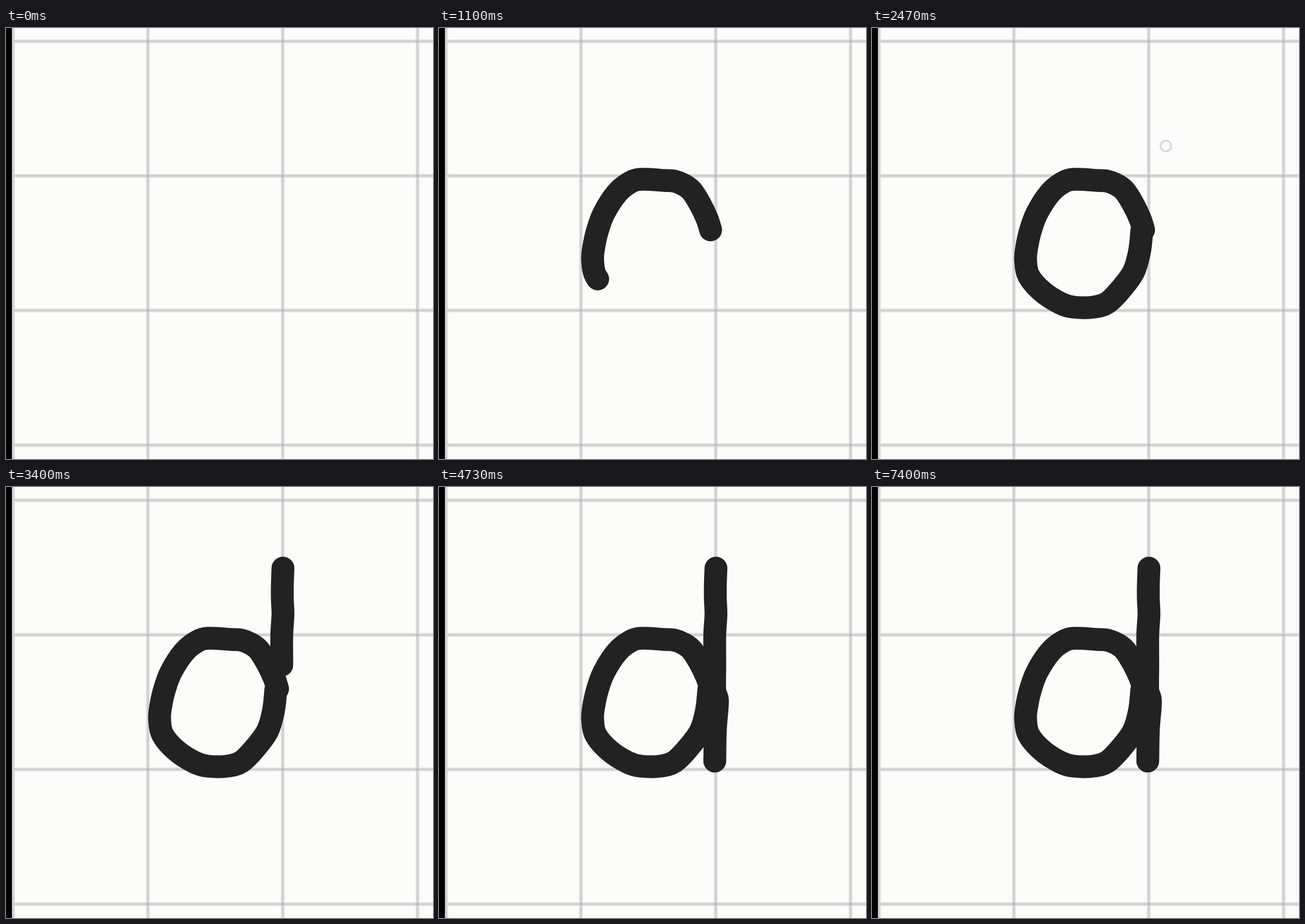
These frames come from a looping animation (720 px wide and 728 px high, 7430 ms). An HTML page:

```html
<!DOCTYPE html>
<html lang="en">
<head>
<meta charset="utf-8">
<title>Handwritten letter</title>
<style>
  html, body { margin: 0; width: 100%; height: 100%; overflow: hidden; background: #fcfcfa; }
  svg { display: block; width: 720px; height: 728px; }
  .soft { stroke: #e9e9e9; stroke-width: 7; }
  .core { stroke: #cfcfd0; stroke-width: 3.5; }
  .ink {
    fill: none; stroke: #222; stroke-width: 38.5;
    stroke-linecap: round; stroke-linejoin: round; stroke-dasharray: 100 900;
  }
  .ink, .pen { animation: 7430ms linear infinite; }
  .bowl { animation-name: bowl; }
  .stem { animation-name: stem; }
  .pen { fill: none; stroke: #ccd8dc; stroke-width: 3; animation-name: pen; }

  /* Dash offset is the percentage still to be written. */
  @keyframes bowl {
    0%, 4.03% { stroke-dashoffset: 100; visibility: hidden; }
    4.04% { stroke-dashoffset: 100; visibility: visible; }
    14.8% { stroke-dashoffset: 43.9; }
    25.17% { stroke-dashoffset: 10.9; }
    28.13%, 100% { stroke-dashoffset: 0; visibility: visible; }
  }
  @keyframes stem {
    0%, 39.02% { stroke-dashoffset: 100; visibility: hidden; }
    39.03% { stroke-dashoffset: 100; visibility: visible; }
    45.76% { stroke-dashoffset: 50; }
    51.14%, 100% { stroke-dashoffset: 0; visibility: visible; }
  }
  @keyframes pen {
    0%, 28.3% { transform: translate(466px, 322px); opacity: 0; }
    28.31% { transform: translate(466px, 322px); opacity: 1; }
    30.96% { transform: translate(488px, 241px); }
    33.24% { transform: translate(495.5px, 199.5px); }
    36.5% { transform: translate(482px, 152px); }
    39.02% { transform: translate(467px, 137px); opacity: 1; }
    39.03%, 100% { transform: translate(467px, 137px); opacity: 0; }
  }
</style>
</head>
<body>
<svg viewBox="0 0 720 728">
  <defs>
    <path id="grid" d="M12 0V728M239.3 0V728M466.6 0V728M693.9 0V728
      M9 22.5H720M9 249.8H720M9 477.1H720M9 704.4H720"/>
  </defs>
  <use href="#grid" class="soft"/>
  <use href="#grid" class="core"/>
  <g id="knots" fill="#bcbcc2"></g>
  <rect width="10" height="728"/>
  <path class="ink bowl" pathLength="100"/>
  <path class="ink stem" pathLength="100"/>
  <circle class="pen" r="9"/>
</svg>
<script>
  const bowl = [
    [458, 341], [452, 322], [440, 297], [426, 275], [413, 265], [398, 259], [380, 257.5], [342, 255.5],
    [322, 261], [300, 279], [278, 313], [267, 343], [261, 370], [259, 391], [264, 418], [287, 445],
    [318, 465], [340, 471.5], [373, 471.5], [397, 464], [420, 441], [441, 412], [451, 378], [455, 342]
  ];
  const stem = [
    [467, 137], [466, 165], [466, 190], [467, 215], [465, 250],
    [465, 300], [465, 343], [469.5, 362], [466, 410], [465, 463]
  ];

  // Catmull-Rom spline through the points, as cubic segments.
  function spline(points) {
    const at = i => points[Math.max(0, Math.min(points.length - 1, i))];
    const lean = (i, sign) => at(i).map((v, k) => v + sign * (at(i + 1)[k] - at(i - 1)[k]) / 6);
    let d = `M${at(0)}`;
    for (let i = 1; i < points.length; i++) d += `C${lean(i - 1, 1)} ${lean(i, -1)} ${at(i)}`;
    return d;
  }
  document.querySelector(".bowl").setAttribute("d", spline(bowl));
  document.querySelector(".stem").setAttribute("d", spline(stem));

  // Darker squares where grid lines cross.
  const step = 227.3;
  let marks = "";
  for (let col = 1; col < 4; col++)
    for (let row = 0; row < 4; row++)
      marks += `<rect x="${9.8 + col * step}" y="${20.3 + row * step}" width="4.4" height="4.4"/>`;
  document.getElementById("knots").innerHTML = marks;
</script>
</body>
</html>
```
